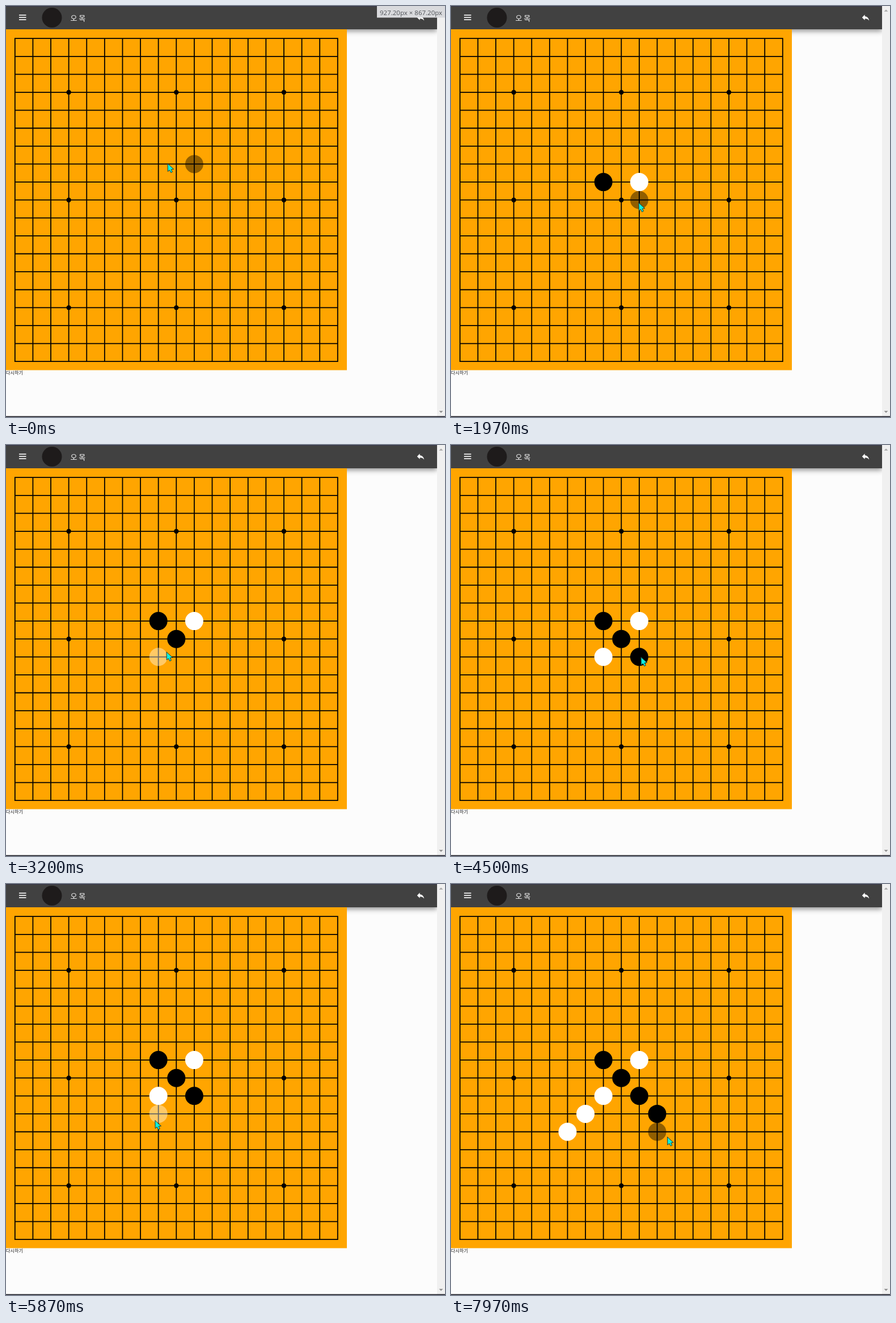
Recreate the animation shown at these times as an HTML page with a canvas. Size 774 by 724 pixels, loop 8 s.

```html
<!DOCTYPE html>
<html lang="ko">
<head>
<meta charset="utf-8">
<title>오목</title>
<style>
  html, body { margin: 0; width: 100%; height: 100%; overflow: hidden; background: #fcfcfc; }
  canvas { display: block; }
</style>
</head>
<body>
<canvas id="stage" width="774" height="724"></canvas>
<script>
const ctx = document.getElementById('stage').getContext('2d');
const LOOP = 8000, START = 1300, HOVER_LAG = 40;
const LEFT = 15.8, TOP = 57.2, STEP = 31.61, LINES = 19;
const KOREAN = '"Noto Sans CJK KR", "Noto Sans CJK", sans-serif';

// Stones in order of play: time, column, row (black moves first)
const moves = [
  [1300, 8, 8], [1730, 10, 8], [2700, 9, 9], [3900, 8, 10],
  [4500, 10, 10], [6070, 7, 11], [6800, 11, 11], [7560, 6, 12]
];

// Pointer path: time, x, y
const path = [
  [0, 285, 278], [1299, 285, 278],
  [1300, 277, 312], [1500, 332, 316], [1860, 332, 316],
  [1970, 331, 347], [2230, 322, 362], [2570, 301, 344], [2820, 301, 344],
  [3050, 282, 352], [3200, 283, 365], [3630, 270, 376], [4010, 270, 376],
  [4330, 335, 374], [4620, 335, 374],
  [4950, 297, 394], [5300, 272, 414], [5570, 265, 418], [5840, 265, 418],
  [5870, 263, 417], [6010, 238, 408], [6130, 238, 408],
  [6530, 364, 409], [6900, 364, 409],
  [7130, 246, 441], [7350, 207, 440], [7620, 207, 440],
  [7970, 381, 446], [8000, 392, 446]
];

const same = (a, b) => a[1] === b[1] && a[2] === b[2];

function slope(i, axis) {
  const a = path[i - 1], p = path[i], b = path[i + 1];
  if (!a || !b || same(a, p) || same(p, b)) return 0;
  return (b[axis] - a[axis]) / (b[0] - a[0]);
}

function pointerAt(t) {
  let i = 0;
  while (i < path.length - 2 && path[i + 1][0] <= t) i++;
  const a = path[i], b = path[i + 1], span = b[0] - a[0];
  const u = (t - a[0]) / span, v = 1 - u;
  return [1, 2].map(k =>
    same(a, b) ? a[k] :
    a[k] * (1 + 2 * u) * v * v + b[k] * (3 - 2 * u) * u * u +
    span * (slope(i, k) * u * v * v - slope(i + 1, k) * u * u * v));
}

function rect(x, y, w, h, color) {
  ctx.fillStyle = color;
  ctx.fillRect(x, y, w, h);
}

function disc(x, y, r, color) {
  ctx.fillStyle = color;
  ctx.beginPath();
  ctx.arc(x, y, r, 0, Math.PI * 2);
  ctx.fill();
}

function label(str, x, y, font, color) {
  ctx.font = font;
  ctx.fillStyle = color;
  ctx.fillText(str, x, y);
}

function triangle(x, y, dir, color) {
  ctx.fillStyle = color;
  ctx.beginPath();
  ctx.moveTo(x - 3.5, y - 1.8 * dir);
  ctx.lineTo(x + 3.5, y - 1.8 * dir);
  ctx.lineTo(x, y + 1.8 * dir);
  ctx.fill();
}

const colX = c => LEFT + c * STEP;
const rowY = r => TOP + r * STEP;
const stone = (c, r, color) => disc(colX(c), rowY(r), 16, color);

const replyIcon = new Path2D('M10 9V5l-7 7 7 7v-4.1c5 0 8.5 1.6 11 5.1-1-5-4-10-11-11z');
const arrow = new Path2D('M0 0L.3 13.6 3.4 11 5.8 15.6 8.4 14.2 6.3 9.9 10.2 9.5Z');

function drawHeader() {
  ctx.save();
  ctx.shadowColor = 'rgba(0,0,0,.45)';
  ctx.shadowBlur = 9;
  ctx.shadowOffsetY = 3;
  rect(0, 0, 760, 41, '#414141');
  ctx.restore();
  rect(0, 0, 760, 1, '#36364c');
  for (const y of [15.3, 19.3, 23.3]) rect(23, y, 12.5, 1.6, '#fff');
  disc(81, 20.5, 17.5, '#1e1b1b');
  label('오 목', 113.5, 25.5, '13px ' + KOREAN, '#f4f4f4');
  ctx.save();
  ctx.translate(722.7, 11.9);
  ctx.scale(.69, .69);
  ctx.fillStyle = '#fff';
  ctx.fill(replyIcon);
  ctx.restore();
}

function drawScrollbar() {
  rect(760, 0, 14, 724, '#f0f0f0');
  triangle(767, 8, -1, '#a8a8a8');
  triangle(767, 715, 1, '#8c8c8c');
}

function drawBoard() {
  rect(0, 41, 601, 600.5, '#ffa500');
  ctx.strokeStyle = '#000';
  ctx.lineWidth = 1.8;
  ctx.lineCap = 'square';
  ctx.beginPath();
  const end = LINES - 1;
  for (let i = 0; i < LINES; i++) {
    ctx.moveTo(colX(i), rowY(0));
    ctx.lineTo(colX(i), rowY(end));
    ctx.moveTo(colX(0), rowY(i));
    ctx.lineTo(colX(end), rowY(i));
  }
  ctx.stroke();
  for (const c of [3, 9, 15])
    for (const r of [3, 9, 15]) disc(colX(c), rowY(r), 4.2, '#000');
}

function drawStones(t) {
  const placed = moves.filter(m => m[0] <= t);
  placed.forEach(([, c, r], i) => stone(c, r, i % 2 ? '#fff' : '#000'));

  let c = 10, r = 7;
  if (t >= START) {
    const [x, y] = pointerAt(Math.max(START, t - HOVER_LAG));
    c = Math.round((x - LEFT) / STEP);
    r = Math.round((y - TOP) / STEP);
  }
  if (!placed.some(m => m[1] === c && m[2] === r))
    stone(c, r, placed.length % 2 ? 'rgba(255,255,255,.4)' : 'rgba(0,0,0,.43)');
}

function drawSizeTip() {
  rect(654, 0, 120, 20.5, '#d9dadd');
  label('927.20px × 867.20px', 659, 15.5, '11.5px "Open Sans", "Noto Sans", sans-serif', '#505358');
}

function drawPointer(t) {
  const [x, y] = pointerAt(t);
  ctx.save();
  ctx.translate(x, y);
  ctx.fillStyle = '#0ff0dc';
  ctx.strokeStyle = '#173c3a';
  ctx.lineWidth = 1;
  ctx.lineJoin = 'round';
  ctx.fill(arrow);
  ctx.stroke(arrow);
  ctx.restore();
}

function draw(t) {
  rect(0, 0, 774, 724, '#fcfcfc');
  drawHeader();
  drawScrollbar();
  drawBoard();
  drawStones(t);
  label('다시하기', 0, 649.3, '8.2px ' + KOREAN, '#222');
  rect(0, 722.5, 774, 1.5, '#1c1c26');
  if (t < START) drawSizeTip();
  drawPointer(t);
}

const began = performance.now();
function tick() {
  draw((performance.now() - began) % LOOP);
  requestAnimationFrame(tick);
}
tick();
</script>
</body>
</html>
```
